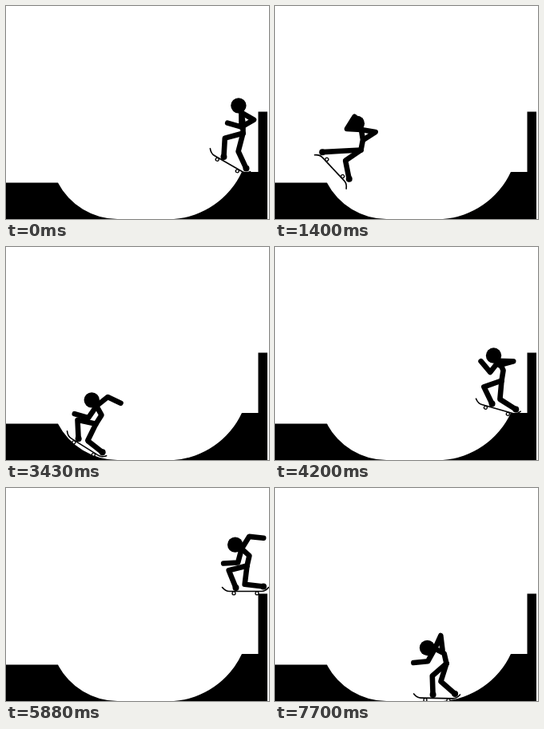
An HTML page that plays this animation: 329 by 267 pixels, repeating every 7.77 s.

```html
<!DOCTYPE html>
<html lang="en">
<head>
<meta charset="utf-8">
<title>Skater in a bowl</title>
<style>
html, body { margin: 0; width: 100%; height: 100%; overflow: hidden; background: #fff; font-family: sans-serif; }
svg { display: block; width: 100vw; height: 100vh; }
.limb { fill: none; stroke: #000; stroke-width: 6.6; stroke-linecap: round; stroke-linejoin: round; }
.deck { fill: none; stroke: #000; stroke-width: 1.6; stroke-linecap: round; }
.wheel { fill: #fff; stroke: #000; stroke-width: 1.3; }
</style>
</head>
<body>
<svg viewBox="0 0 329 267">
  <path d="M0 221.5H65A84 84 0 0 0 140 267H0Z"/>
  <path d="M210 267A102 102 0 0 0 295 208H315.5V132.5H327V267Z"/>
  <g transform="translate(.5 .5)">
    <g id="board">
      <path class="deck" d="M-29 -5Q-25 0 -20 0H20Q25 0 29 -5"/>
      <circle class="wheel" cx="-14.5" cy="2.4" r="2"/>
      <circle class="wheel" cx="14.5" cy="2.4" r="2"/>
    </g>
    <g id="rider"></g>
  </g>
</svg>
<script>
const STEP = 70, FRAMES = 111, RAD = Math.PI / 180;
const SPINE = 13, NECK = 9.5, ARM = 18, LEG = 23.5;
const LEAN = .6, HIP_LEAN = .7; // share of the board's tilt that the body follows

const turn = ([x, y], deg) => {
  const c = Math.cos(deg * RAD), s = Math.sin(deg * RAD);
  return [x * c - y * s, x * s + y * c];
};
const plus = (a, b) => [a[0] + b[0], a[1] + b[1]];
// Bone end; 0 degrees is up, clockwise.
const bone = (from, length, deg) => plus(from, turn([0, -length], deg));

// Knee between hip and foot; bend 1 points it to the left, -1 to the right.
function knee(hip, foot, bend) {
  const dx = foot[0] - hip[0], dy = foot[1] - hip[1], d = Math.hypot(dx, dy);
  const out = bend * Math.sqrt(Math.max(0, LEG * LEG - d * d / 4)) / d;
  return [hip[0] + dx / 2 - dy * out, hip[1] + dy / 2 + dx * out];
}

// Height and slope of a board rolling along the bowl.
function bowl(x) {
  if (x >= 140 && x <= 203) return { y: 262, angle: 0 };
  const left = x < 140, r = left ? 79.1 : 98.5;
  const u = Math.min(left ? 140 - x : x - 203, r * .95);
  const angle = Math.asin(u / r) / RAD, drop = Math.sqrt(r * r - u * u);
  return left ? { y: 183 + drop, angle } : { y: Math.min(262, 165 + drop), angle: -angle };
}

// Hip is relative to the board, bone angles are as seen at the given tilt.
const pose = ({ x, y, tilt, hip, front, bend = 1, bones }) => ({
  x, y, tilt,
  shape: [...turn(hip, -tilt * HIP_LEAN), front, bend, ...bones.map(a => a - tilt * LEAN)]
});

// Bones: lower and upper spine, neck, back arm, front arm.
const stand = pose({ x: 277.5, y: 197, tilt: 30, hip: [18.5, -38], front: -9,
  bones: [0, -9, -22, 120, 240, 180, 286] });
const tuck = pose({ x: 72.5, y: 204, tilt: 47, hip: [34.5, -24], front: -25,
  bones: [11, -9, -36, 100, 237, 273, 392] });
const crouch = pose({ x: 191, y: 262, tilt: 0, hip: [2, -32], front: -12,
  bones: [13, -48, -58, 32, 96, 195, 267] });
const lean = pose({ x: 277.5, y: 202.5, tilt: 16, hip: [5.5, -35.5], front: -8,
  bones: [9, -24, -45, 92, 255, 218, 320] });
const slide = pose({ x: 77.5, y: 207, tilt: 16, hip: [28.5, -26], front: -15, bend: -1,
  bones: [45, -11, -23, 96, 196, 276, 398] });
const carve = pose({ x: 258, y: 246.5, tilt: -34, hip: [-14, -38], front: -8,
  bones: [10, -66, -76, 11, 84, 122, 261] });
const cruise = pose({ x: 202, y: 263, tilt: 1, hip: [12, -43.5], front: -5,
  bones: [-13, -63, -84, 24, 173, 209, 264] });

const keys = [];
function place(frame, p, { x, y, tilt } = p) {
  const b = bowl(x);
  keys.push({ frame, v: [x, b.y - y, tilt - b.angle, ...p.shape] });
}
const hold = (from, to, p, at) => { place(from, p, at); place(to, p, at); };
const roll = (frame, p, x) => keys.push({ frame, v: [x, 0, 0, ...p.shape] });

// Steady run across the bowl between its two sides.
const LEFT = 84, RIGHT = carve.x;
function cross(from, to, toLeft) {
  const part = (RIGHT - crouch.x) / (RIGHT - LEFT);
  roll(from, toLeft ? carve : crouch, toLeft ? RIGHT : LEFT);
  roll(from + (to - from) * (toLeft ? part : 1 - part), crouch, crouch.x);
  roll(to, toLeft ? crouch : carve, toLeft ? LEFT : RIGHT);
}

hold(0, 2, stand);
cross(6, 12, true);
hold(14, 17, slide, { x: 67, y: 204, tilt: 26 });
place(20, tuck);
cross(22, 28.5, false);
place(31, lean, { x: 285, y: 193, tilt: -10 });
cross(33, 41, true);
hold(43, 46, slide, { x: 70, y: 204, tilt: 18 });
cross(48, 56.5, false);
hold(59, 61, lean);
cross(64, 71, true);
place(74, slide);
cross(75, 79.5, false);
place(81, carve, { x: 276, y: 181, tilt: -58 });
hold(84, 90, crouch, { x: 299, y: 129, tilt: 0 });
place(93, crouch, { x: 282, y: 142, tilt: -25 });
cross(96, 103, true);
place(104.5, slide, { x: 82, y: 208, tilt: 50 });
roll(106, crouch, LEFT);
place(110, cruise);

const slope = (k, n) => {
  const a = keys[k], b = keys[k + 1];
  return a && b ? (b.v[n] - a.v[n]) / (b.frame - a.frame) : null;
};
// Tangents that never overshoot a key.
function tangent(k, n) {
  const a = slope(k - 1, n), b = slope(k, n);
  if (a === null || b === null) return a ?? b;
  return a * b <= 0 ? 0 : 2 * a * b / (a + b);
}
function sample(frame) {
  let k = 0;
  while (k < keys.length - 2 && keys[k + 1].frame <= frame) k++;
  const a = keys[k], b = keys[k + 1], d = b.frame - a.frame, t = (frame - a.frame) / d;
  const h = t * t * (3 - 2 * t);
  return a.v.map((p, n) => p * (1 - h) + b.v[n] * h
    + d * t * (1 - t) * ((1 - t) * tangent(k, n) - t * tangent(k + 1, n)));
}

const board = document.getElementById('board'), rider = document.getElementById('rider');
function add(tag, attrs) {
  const el = document.createElementNS('http://www.w3.org/2000/svg', tag);
  for (const name in attrs) el.setAttribute(name, attrs[name]);
  return rider.appendChild(el);
}
const limbs = Array.from({ length: 5 }, () => add('polyline', { class: 'limb' }));
const balls = [9.7, 4, 4].map(r => add('circle', { r }));

function draw(frame) {
  const [x, lift, tilt, hipX, hipY, front, bend, ...bones] = sample(frame);
  const b = bowl(x), centre = [x, b.y - lift], angle = b.angle + tilt;
  const [low, high, neck, ...arms] = bones.map(a => a + angle * LEAN);

  const hip = plus(centre, turn([hipX, hipY], angle * HIP_LEAN));
  const chest = bone(hip, SPINE, low), shoulder = bone(chest, SPINE, high);
  const head = bone(shoulder, NECK, neck);
  const arm = (upper, lower) => {
    const elbow = bone(shoulder, ARM, upper);
    return [shoulder, elbow, bone(elbow, ARM, lower)];
  };
  const feet = [[front, -4.5], [22.5, -6]].map(p => plus(centre, turn(p, angle)));
  const lines = [
    [hip, chest, shoulder], arm(arms[0], arms[1]), arm(arms[2], arms[3]),
    [hip, knee(hip, feet[0], 1), feet[0]], [hip, knee(hip, feet[1], bend), feet[1]]
  ];
  limbs.forEach((el, i) => el.setAttribute('points', lines[i].join(' ')));
  [head, ...feet].forEach(([cx, cy], i) => {
    balls[i].setAttribute('cx', cx);
    balls[i].setAttribute('cy', cy);
  });

  const flip = Math.min(1, Math.max(0, (frame - 17) / 6));
  board.setAttribute('transform',
    `translate(${centre}) rotate(${angle}) scale(1 ${Math.cos(flip * 2 * Math.PI)})`);
}

const start = performance.now();
function tick() {
  draw(Math.floor((performance.now() - start) / STEP) % FRAMES);
  requestAnimationFrame(tick);
}
tick();
</script>
</body>
</html>
```
